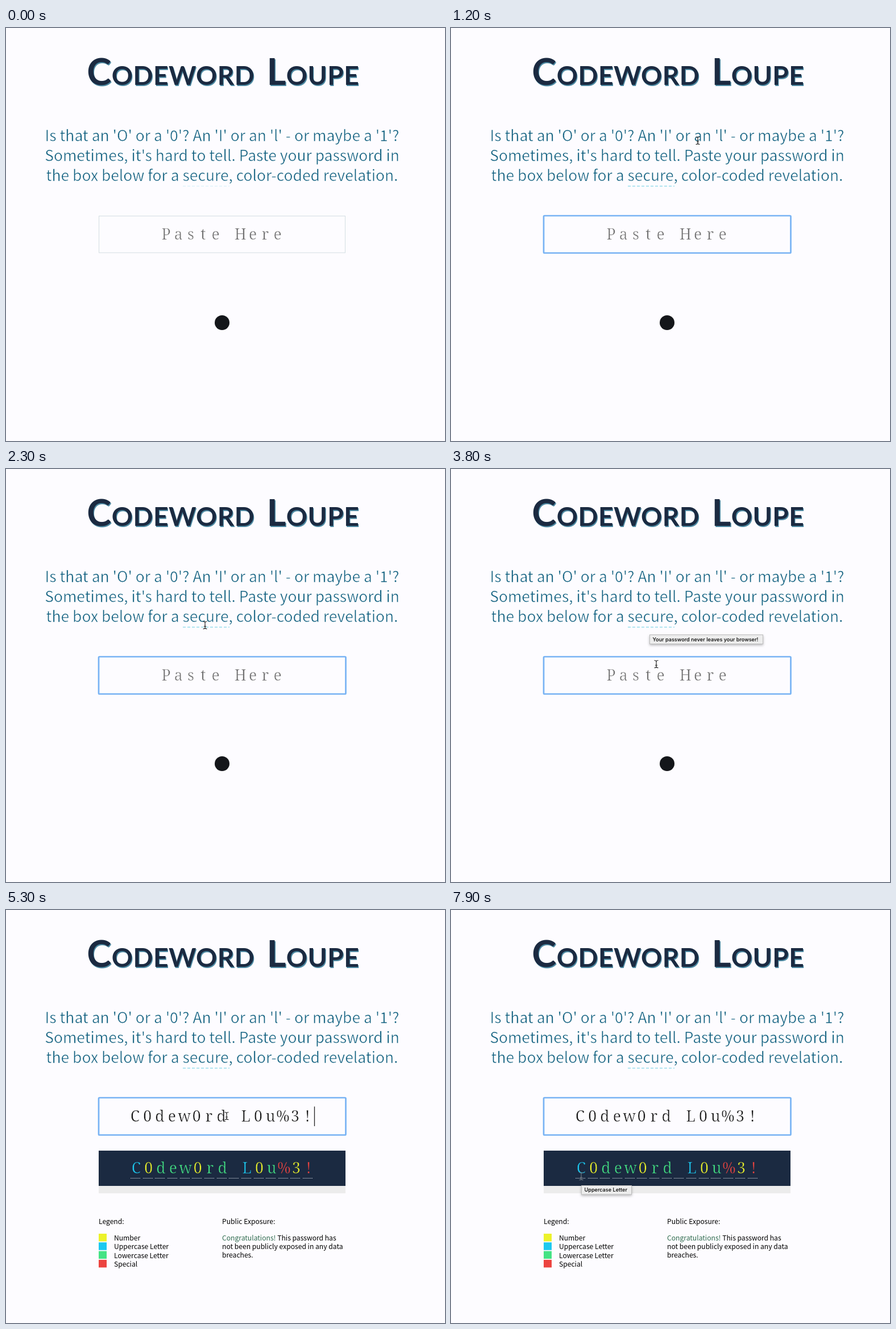
These frames come from a looping animation (772 by 726 pixels, 8 s). An HTML page:

```html
<!DOCTYPE html>
<html lang="en">
<head>
<meta charset="utf-8">
<title>Codeword Loupe</title>
<style>
html, body { margin: 0; width: 100%; height: 100%; overflow: hidden; background: #fdfcff; }
svg { display: block; width: 772px; height: 726px; }
text { white-space: pre; }
.title { font: 700 65px Lato, sans-serif; font-variant: small-caps; letter-spacing: .5px; word-spacing: 5px; fill: #1b2a41; }
.title.shade { fill: #4d8aa3; }
.intro { font: 300 26.4px "Noto Sans CJK JP", "Noto Sans CJK SC", sans-serif; fill: #10607f; }
.mid { text-anchor: middle; }
.mono { font: 300 26.5px "Noto Serif", serif; text-anchor: middle; }
/* a background-coloured outline thins the strokes */
.intro, .mono { stroke: #fdfcff; stroke-width: .55; }
#coded { stroke: #1b2a41; }
.small { font: 12.12px "Noto Sans CJK JP", "Noto Sans CJK SC", sans-serif; }
.tip text { font: 500 9.15px Inter, sans-serif; }
.tip rect { fill: #ededed; stroke: #bcbcbc; filter: drop-shadow(0 2px 2px #0004); }
</style>
</head>
<body>
<svg viewBox="0 0 772 726">
  <text class="title shade mid" x="383" y="101.5">Codeword Loupe</text>
  <text class="title mid" x="381.7" y="100">Codeword Loupe</text>
  <g class="intro mid">
    <text x="380" y="199.3">Is that an 'O' or a '0'? An 'I' or an 'l' - or maybe a '1'?</text>
    <text x="380" y="234.2">Sometimes, it's hard to tell. Paste your password in</text>
    <text x="380" y="269">the box below for a secure, color-coded revelation.</text>
  </g>
  <path id="dash" d="M311 278H393" stroke="#9bddec" stroke-width="1.5" stroke-dasharray="5 3"/>

  <rect id="field" fill="#fdfcff"/>
  <g id="empty">
    <g id="hint" class="mono" fill="#707070"></g>
    <circle cx="380" cy="518" r="13" fill="#14161a"/>
  </g>

  <g id="result">
    <g id="typed" class="mono" fill="#161616"></g>
    <path id="caret" d="M542.5 345.5V380" stroke="#222" stroke-width="1.3"/>
    <rect x="163" y="423" width="434" height="62" fill="#1b2a41"/>
    <rect x="163" y="485" width="434" height="13" fill="#ececec"/>
    <g id="coded" class="mono"></g>
    <path id="dots" stroke="#dfe5ec" stroke-dasharray="1 1"/>
    <g class="small">
      <text x="163" y="552">Legend:</text>
      <text x="380" y="552">Public Exposure:</text>
      <g id="legend"></g>
      <text x="380" y="581"><tspan fill="#2f6b4f">Congratulations!</tspan> This password has</text>
      <text x="380" y="596">not been publicly exposed in any data</text>
      <text x="380" y="611">breaches.</text>
    </g>
  </g>

  <g id="tipSafe" class="tip">
    <rect x="349.5" y="291.5" width="199" height="16"/>
    <text x="354.5" y="302.5">Your password never leaves your browser!</text>
  </g>
  <g id="tipCase" class="tip">
    <rect x="229.5" y="484.5" width="88" height="15.5"/>
    <text x="234.5" y="495.3">Uppercase Letter</text>
  </g>
  <g id="cursor" fill="none">
    <path d="M-3.5-6.5Q0-6.5 0-4.5Q0-6.5 3.5-6.5M0-5V5M-3.5 6.5Q0 6.5 0 4.5Q0 6.5 3.5 6.5M-2 2H2" stroke-width="1.2"/>
  </g>
</svg>
<script>
const $ = id => document.getElementById(id);
const LOOP = 8000, PASTE = 4600;
const secret = 'C0dew0rd L0u%3!';
const kinds = [
  ['Number', '#ecf22a', /\d/],
  ['Uppercase Letter', '#1dc9f0', /[A-Z]/],
  ['Lowercase Letter', '#44e384', /[a-z]/],
  ['Special', '#ec4440', /./]
];
const colorOf = c => kinds.find(k => k[2].test(c))[1];

// One centred character per fixed-pitch cell
const cells = (str, x, y, pitch, color) => [...str].map((c, i) =>
  `<text x="${x + i * pitch}" y="${y}"${color ? ` fill="${color(c)}"` : ''}>${c}</text>`).join('');

$('hint').innerHTML = cells('Paste Here', 281.5, 372, 21.8);
$('typed').innerHTML = cells(secret, 227, 372, 21.65);
$('coded').innerHTML = cells(secret, 229, 463, 21.65, colorOf);
$('dots').setAttribute('d', [...secret].map((c, i) => `M${Math.round(219 + i * 21.65)} 471.5h18`).join(''));
$('legend').innerHTML = kinds.map(([name, color], i) => {
  const y = 569 + i * 15.3;
  return `<rect x="163" y="${y}" width="14" height="13.5" fill="${color}"/>
    <text x="190" y="${y + 12}">${name}</text>`;
}).join('');

// Pointer path: time, x, y
const path = [
  [400, 425, 362], [700, 425, 362], [1200, 434, 198], [1500, 434, 198], [2200, 350, 274.5],
  [3600, 350, 274.5], [3800, 361, 343], [4100, 388, 362], [5400, 388, 362], [6500, 229, 468], [LOOP, 229, 468]
];
const clamp = v => Math.max(0, Math.min(1, v));
const ease = u => u * u * (3 - 2 * u);
function pointer(t) {
  const i = Math.max(1, path.findIndex(p => p[0] > t));
  const [a, b] = [path[i - 1], path[i]];
  const u = ease(clamp((t - a[0]) / (b[0] - a[0])));
  return [1, 2].map(k => a[k] + (b[k] - a[k]) * u);
}

const show = (id, on) => $(id).setAttribute('opacity', +on);
function setField(focused) {
  const attrs = focused
    ? { x: 163, y: 330, width: 434.5, height: 65.5, rx: 1.5, stroke: '#78b3f4', 'stroke-width': 2.7 }
    : { x: 163.5, y: 330.5, width: 433, height: 64.5, rx: 0, stroke: '#d3dee2', 'stroke-width': 1 };
  for (const k in attrs) $('field').setAttribute(k, attrs[k]);
}

function draw(t) {
  const pasted = t >= PASTE;
  setField(t >= 500);
  show('dash', t < 500 ? .3 : 1);
  show('empty', !pasted);
  show('result', pasted);
  show('caret', (t + 750) % 1000 < 500);
  show('tipSafe', t < 2800 ? 0 : clamp((4150 - t) / 250));
  show('tipCase', t >= 7300);
  const [x, y] = pointer(t);
  show('cursor', t >= path[0][0]);
  $('cursor').setAttribute('transform', `translate(${x} ${y})`);
  $('cursor').setAttribute('stroke', pasted && y > 423 ? '#6d7680' : '#222');
}

function tick(now) {
  draw(now % LOOP);
  requestAnimationFrame(tick);
}
draw(0);
requestAnimationFrame(tick);
</script>
</body>
</html>
```
